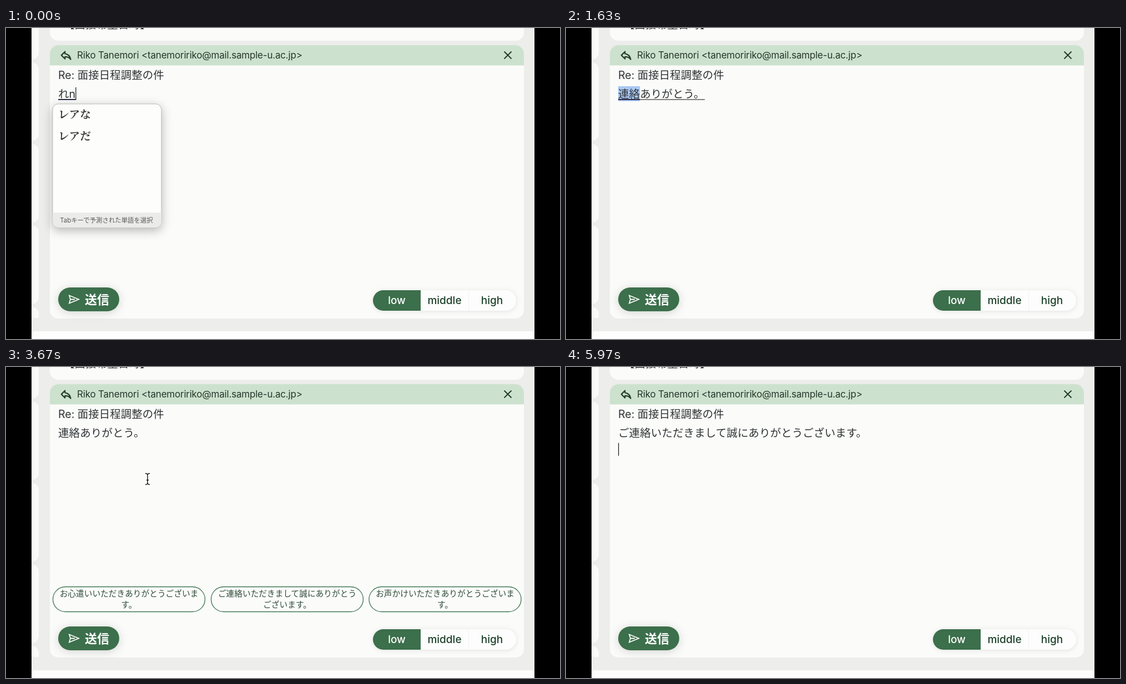
Recreate the animation shown at these times as an HTML page. Size 998 by 561 pixels, loop 6.01 s.

```html
<!DOCTYPE html>
<html lang="ja">
<head>
<meta charset="utf-8">
<title>Reply assistant</title>
<style>
html, body { margin: 0; width: 100%; height: 100%; overflow: hidden; background: #000; }
svg { display: block; width: 998px; height: 561px; font-family: Inter, "Noto Sans CJK JP", sans-serif; }
text { white-space: pre; }
.body { font-size: 19.6px; fill: #303335; }
.serif { font: 700 19.6px "Noto Serif CJK JP", "Noto Sans CJK JP", serif; fill: #3b3b3b; }
.small { font-size: 14.7px; fill: #2f4a38; text-anchor: middle; }
.seg { font-size: 19px; font-weight: 500; fill: #1d4029; text-anchor: middle; }
.pill { fill: #3c6f4b; fill-opacity: 0; stroke: #3f7650; stroke-width: 1.3; }
.popup { filter: drop-shadow(0 5px 9px rgba(0, 0, 0, .27)); }
.raised { filter: drop-shadow(0 2px 8px rgba(0, 0, 0, .17)); }
.soft { filter: drop-shadow(0 1px 4px rgba(0, 0, 0, .1)); }
</style>
</head>
<body>
<svg viewBox="0 0 998 561">
  <defs>
    <clipPath id="page"><rect x="46" width="906" height="523"/></clipPath>
    <clipPath id="track"><rect x="79" y="28" width="787" height="7.5" rx="3.75"/></clipPath>
    <clipPath id="sheet"><rect x="79" y="31" width="854" height="493" rx="15"/></clipPath>
    <clipPath id="menu"><rect id="menuClip" x="84" y="137" height="223" rx="10"/></clipPath>
  </defs>
  <rect width="998" height="561" fill="#000"/>
  <rect x="46" width="906" height="561" fill="#fdfdfd"/>
  <rect x="46" width="906" height="547" fill="#ededec"/>
  <g id="cards" clip-path="url(#page)" fill="#fafaf9"></g>
  <rect x="79" y="-40" width="854" height="63" rx="15" fill="#fbfcfa"/>
  <text class="body" x="104" y="1">【面接希望日時】</text>

  <g id="progress">
    <g clip-path="url(#track)">
      <rect x="79" y="28" width="787" height="8" fill="#e6e9f0"/>
      <rect id="bar" y="28" width="787" height="7.5" rx="3.75" fill="#5dba38"/>
    </g>
    <g fill="none" stroke="#62bd40" stroke-width="1.3">
      <circle cx="881" cy="32" r="7.2"/>
      <path d="M877.6 32.2l2.5 2.5 4.4-4.7"/>
    </g>
  </g>

  <g id="panel">
    <g clip-path="url(#sheet)">
      <rect x="79" y="31" width="854" height="493" fill="#fbfcfa"/>
      <rect x="79" y="31" width="854" height="36.5" fill="#cde2ce"/>
    </g>
    <path transform="translate(97 38) scale(.93)" fill="none" stroke="#26402e" stroke-width="2.4" stroke-linejoin="round"
      d="M10 9V5l-7 7 7 7v-4.1c5 0 8.5 1.6 11 5.1-1-5-4-10-11-11z"/>
    <text x="128" y="55" font-size="17" letter-spacing="-.2" fill="#26362c">Riko Tanemori &lt;tanemoririko@mail.sample-u.ac.jp&gt;</text>
    <path d="M897.5 42.5l13 13m0-13l-13 13" stroke="#1f3a28" stroke-width="1.9"/>
    <text class="body" x="94" y="92" style="font-size:19.5px">Re: 面接日程調整の件</text>

    <rect id="select" x="94" y="105" width="39.2" height="27" fill="#a9c8f3"/>
    <text id="draft" class="body" x="94" y="126"></text>
    <rect id="thick" x="94" y="128" height="2" fill="#2c2943"/>
    <rect id="thin" x="133" y="128.5" width="117" height="1.2" fill="#333"/>
    <rect id="caret" width="1.3" height="23" fill="#222"/>

    <g id="pills"></g>

    <rect class="raised" x="94" y="468" width="110" height="43" rx="21.5" fill="#3c6f4b"/>
    <path d="M114 482.5l17 7-17 7 2-7zM116 489.5h8" fill="none" stroke="#fff" stroke-width="1.8"/>
    <text x="142" y="497.5" font-size="22" font-weight="700" fill="#fff">送信</text>

    <rect class="soft" x="661" y="473" width="258" height="37" rx="18.5" fill="#fcfdfc"/>
    <path d="M833.5 473v37" stroke="#f1f2f0"/>
    <path d="M747 473h-67.500a18.500 18.500 0 0 0 0 37H747z" fill="#3c6f4b"/>
    <text class="seg" x="704" y="498" style="fill:#fff">low</text>
    <text class="seg" x="790" y="498">middle</text>
    <text class="seg" x="875.5" y="498">high</text>
  </g>

  <g id="popup">
    <rect id="menuBox" class="popup" x="84" y="137" height="223" rx="10" fill="#fdfdfc" stroke="#b9b9b2"/>
    <rect x="84" y="333" width="500" height="27" fill="#ebebea" clip-path="url(#menu)"/>
    <g id="words" class="serif"></g>
    <text id="hint" y="350.500" font-size="11.4" fill="#595959" text-anchor="middle">Tabキーで予測された単語を選択</text>
  </g>

  <g id="beam" fill="none">
    <path d="M-4-10q4 0 4 3q0-3 4-3M0-7V7M-4 10q4 0 4-3q0 3 4 3M-2 2h4" stroke="#fff" stroke-width="3"/>
    <path d="M-4-10q4 0 4 3q0-3 4-3M0-7V7M-4 10q4 0 4-3q0 3 4 3M-2 2h4" stroke="#111" stroke-width="1.4"/>
  </g>
  <g id="hand" fill="#fff" stroke="#111" stroke-width="1.4" stroke-linejoin="round">
    <path d="M-5.500-8.500c0-2.400 3.400-2.400 3.500 0l.6 5c.3-1.400 3-1.400 3.200.3.400-1.300 2.900-1.100 3.100.6.500-1.200 3-.8 3 1.200v4.400c0 3-1.700 3.600-1.700 6.500h-8.700c-.2-2.600-3-4.300-4.600-7.300-1-1.600-2.200-2.900-1.200-3.900s2.600-.2 3.800 1.700z"/>
    <path d="M-.5 3v4M2 3v4M4.500 3v4" fill="none" stroke-width="1"/>
  </g>
</svg>
<script>
const LOOP = 6010;
const CONVERT = 1290, COMMIT = 1780, LOAD = 1818, READY = 3250, CLICK = 5040, ENTER = 5700;
const $ = id => document.getElementById(id);
const set = (id, attrs) => { for (const k in attrs) $(id).setAttribute(k, attrs[k]); };
const show = (id, on) => $(id).setAttribute('visibility', on ? 'visible' : 'hidden');
const at = (list, t) => list.filter(s => s[0] <= t).pop();
const within = (t, a, b) => t >= a && t < b;

// Typed text, by start time
const typing = [
  [0, 'れn'], [70, 'れん'], [150, 'れんr'], [220, 'れんら'], [290, 'れんらk'], [360, 'れんらく'],
  [430, 'れんらくあ'], [500, 'れんらくあr'], [560, 'れんらくあり'], [630, 'れんらくありg'],
  [690, 'れんらくありが'], [760, 'れんらくありがt'], [820, 'れんらくありがと'],
  [890, 'れんらくありがとう'], [1090, 'れんらくありがとう。'],
  [CONVERT, '連絡ありがとう。'], [CLICK, 'ご連絡いただきまして誠にありがとうございます。']
];
const thanks = ['連絡ありがとう', '連絡ありがとうございます'];
const guesses = [
  [0, ['レアな', 'レアだ']],
  [70, ['連絡', '連携', '連休']],
  [220, ['連絡', '連絡先', '連絡します']],
  [430, ['連絡あり', ...thanks]],
  [690, thanks],
  [890, [...thanks, '連絡有難う', '連絡有り難う']],
  [1090, ['連絡ありがとう。', '連絡有難う。', '連絡有り難う。']]
];
const replies = [
  [84, 'お心遣いいただきありがとうございま', 'す。'],
  [369, 'ご連絡いただきまして誠にありがとう', 'ございます。'],
  [653.5, 'お声かけいただきありがとうございま', 'す。']
];
// Pointer stops: time, x, y
const path = [[2150, 232, 168], [2370, 240, 177], [2900, 249, 193], [3400, 255, 202], [3800, 255, 202], [4380, 470, 429], [LOOP, 470, 429]];

$('cards').innerHTML = [0, 1, 2, 3, 4].map(i =>
  `<rect x="16" y="${-85 + 147 * i}" width="43" height="142" rx="13"/>`).join('');
$('pills').innerHTML = replies.map(([x, a, b], i) =>
  `<rect id="pill${i}" class="pill" x="${x + .5}" y="396.5" width="274" height="45" rx="22.5"/>
   <text class="small" x="${x + 137.5}" y="414">${a}</text>
   <text class="small" x="${x + 137.5}" y="434">${b}</text>`).join('');

// CSS "ease" curve solved by bisection
function ease(x) {
  const bez = (a, b, s) => 3 * a * s * (1 - s) ** 2 + 3 * b * s * s * (1 - s) + s ** 3;
  let lo = 0, hi = 1;
  for (let i = 0; i < 20; i++) {
    const mid = (lo + hi) / 2;
    if (bez(.25, .25, mid) < x) lo = mid; else hi = mid;
  }
  return bez(.1, 1, lo);
}

function pointer(t) {
  const i = Math.max(1, path.findIndex(p => p[0] > t));
  const [t0, x0, y0] = path[i - 1], [t1, x1, y1] = path[i];
  const u = Math.max(0, (t - t0) / (t1 - t0)), k = u * u * (3 - 2 * u);
  return [x0 + (x1 - x0) * k, y0 + (y1 - y0) * k];
}

let shown;
function drawPopup(words) {
  if (words === shown) return;
  shown = words;
  const width = Math.max(196, Math.max(...words.map(w => w.length)) * 19.6 + 60);
  set('menuBox', { width });
  set('menuClip', { width });
  set('hint', { x: 83 + width / 2 });
  $('words').innerHTML = words.map((w, i) => `<text x="94" y="${163 + i * 39.3}">${w}</text>`).join('');
}

function drawDraft(t) {
  const text = at(typing, t)[1];
  if ($('draft').textContent !== text) $('draft').textContent = text;
  const composing = t < CONVERT, converting = within(t, CONVERT, COMMIT);
  const end = 94 + $('draft').getComputedTextLength();
  show('select', converting);
  show('thin', converting);
  show('thick', t < COMMIT);
  set('thick', { width: composing ? end - 94 : 39.2 });
  const newline = t >= ENTER;
  set('caret', { x: newline ? 94 : end, y: newline ? 137 : 107 });
  show('caret', composing || newline || [[COMMIT, LOAD], [READY, 3600], [4100, 4600], [CLICK, 5540]].some(s => within(t, ...s)));
}

function draw(t) {
  const loading = within(t, LOAD, READY), offering = within(t, READY, CLICK);
  drawDraft(t);
  show('popup', t < CONVERT);
  if (t < CONVERT) drawPopup(at(guesses, t)[1]);
  show('progress', loading);
  set('bar', { x: 79 + 787 * (2 * ease(Math.min(1, Math.max(0, (t - LOAD) / 3000))) - 1) });
  set('panel', { transform: `translate(0 ${loading ? 18 : 0})` });
  show('pills', offering);

  const [x, y] = pointer(t);
  const visible = within(t, 2150, ENTER), over = offering && y > 397;
  show('beam', visible && !over);
  show('hand', visible && over);
  set('beam', { transform: `translate(${x} ${y})` });
  set('hand', { transform: `translate(${x} ${y})` });
  set('pill1', { style: `fill-opacity:${over ? .09 : 0}` });
}

function frame() {
  draw(performance.now() % LOOP);
  requestAnimationFrame(frame);
}
frame();
</script>
</body>
</html>
```
